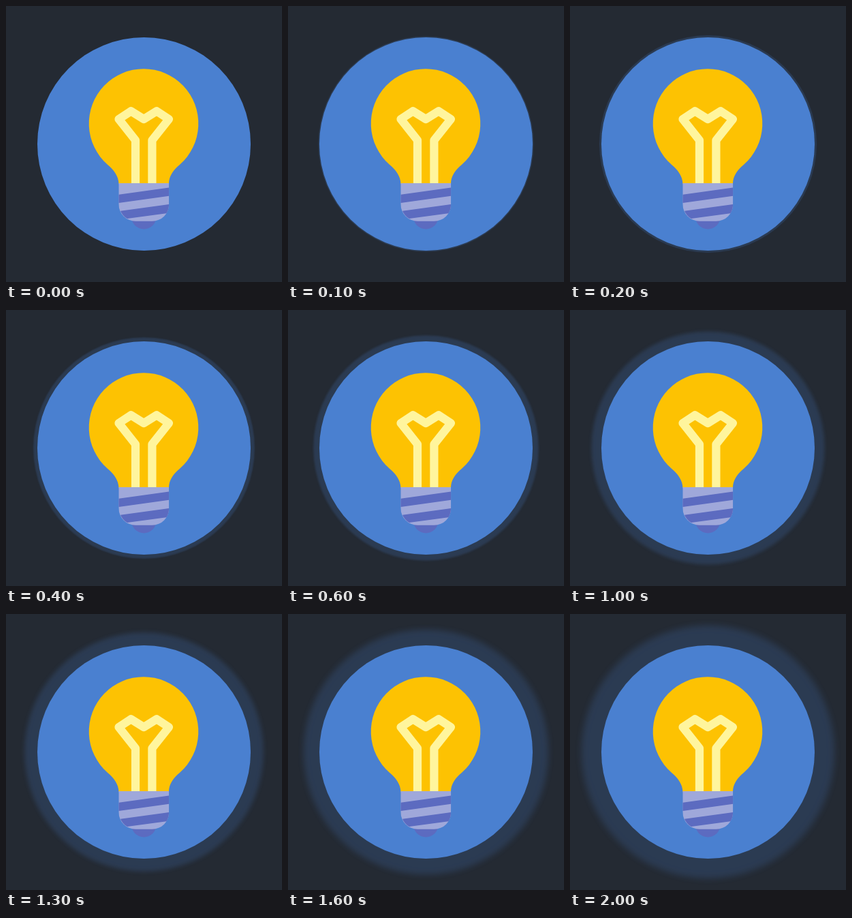
An HTML page for the animation above (2.4 s loop, 405 px wide and 405 px high).

```html
<!DOCTYPE html>
<html lang="en">
<head>
<meta charset="utf-8">
<title>Pulsing light bulb</title>
<style>
  html, body {
    margin: 0;
    width: 100%;
    height: 100%;
    overflow: hidden;
    background: #242a33;
  }
  #disc {
    position: absolute;
    left: 46px;
    top: 46px;
    width: 313px;
    height: 313px;
    border-radius: 50%;
    background: #4a80d0;
  }
  svg {
    position: absolute;
    left: 0;
    top: 0;
  }
</style>
</head>
<body>
<div id="disc"></div>
<svg width="405" height="405" viewBox="0 0 405 405">
  <path fill="#fdc202" d="M149.2 233A80.3 80.3 0 1 1 254.8 233C245 241 239 250 239 261H165.5C165 250 159 241 149.2 233Z"/>
  <path fill="none" stroke="#fff59d" stroke-width="12.2" stroke-linejoin="round"
        d="M190 261V197L165.5 166L183.3 154.3L202.2 166L221.1 154.3L239 166L214.4 197V261"/>
  <g transform="translate(202.3 260) scale(6.13)" fill="#5c6bc0">
    <circle cy="8" r="3"/>
    <path fill="#9fa8da" d="M2 9.1H-2A4 4 0 0 1 -6 5V0H6V5A4 4 0 0 1 2 9.1Z"/>
    <path d="M-6 2.75V4.75L6 3.05V1.05Z"/>
    <path d="M6 5.05L-5.6 6.65Q-5.1 7.8 -4 8.5L5.4 7.2Q6 6.3 6 5.05Z"/>
  </g>
</svg>
<script>
  const LOOP = 2400;
  const SPREAD = 35;
  const BLUR = 12;
  const times = [0, 100, 200, 300, 400, 600, 800, 1000, 1300, 1600, 2000];

  // The halo grows evenly with time but is held between the steps.
  const halo = t => {
    const p = t / LOOP;
    return `0 0 ${BLUR * p}px ${SPREAD * p}px rgba(74, 128, 208, 0.2)`;
  };

  const frames = times.map(t => ({
    offset: t / LOOP,
    boxShadow: halo(t),
    easing: "step-end"
  }));
  frames.push({ offset: 1, boxShadow: halo(times[times.length - 1]) });

  document.getElementById("disc").animate(frames, {
    duration: LOOP,
    iterations: Infinity
  });
</script>
</body>
</html>
```
